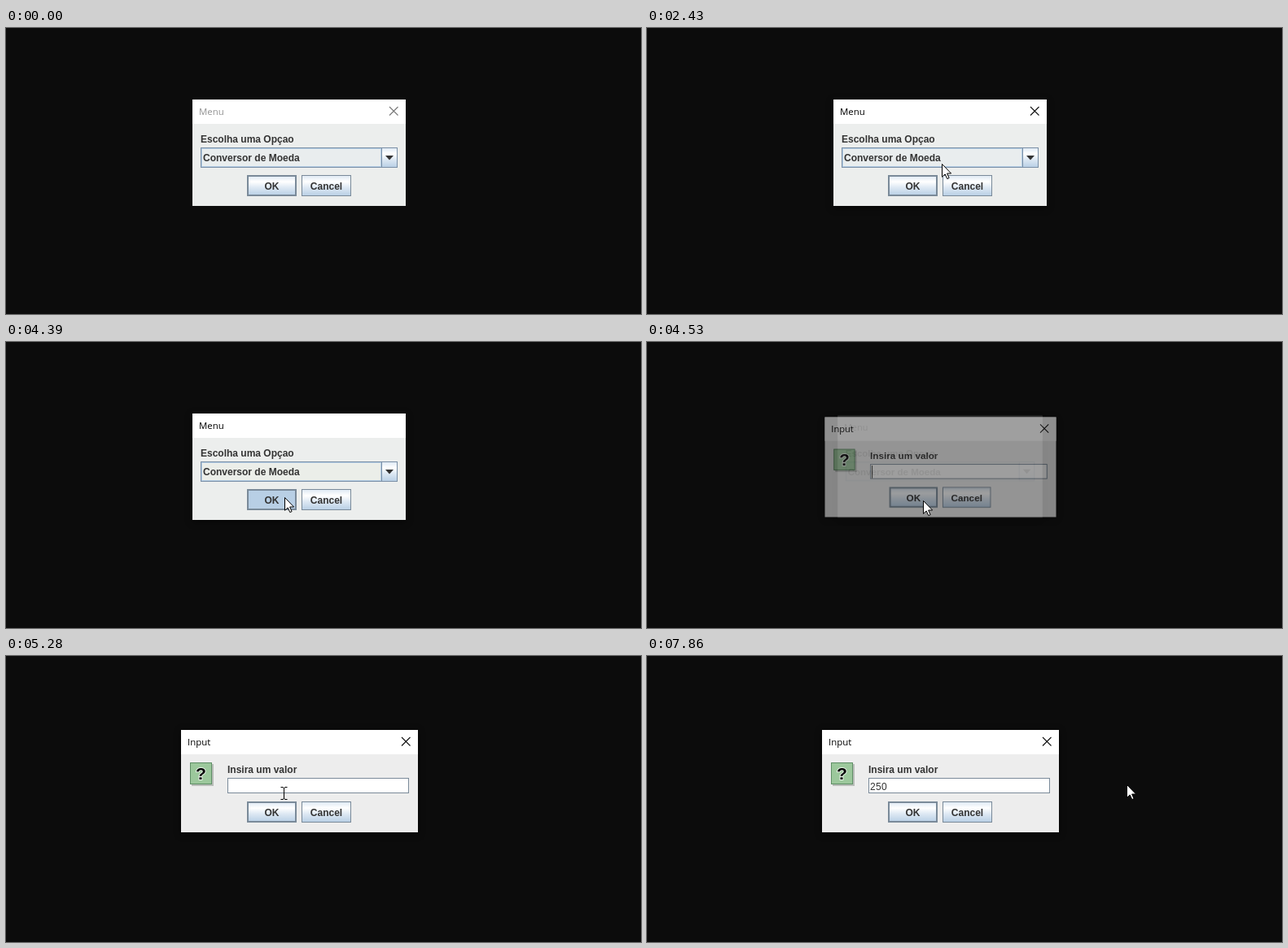
Write an HTML page that moves like this. It is 780 px wide and 352 px high and loops after 8000 ms.

```html
<!DOCTYPE html>
<html lang="pt">
<head>
<meta charset="utf-8">
<title>Menu</title>
<style>
  html, body { margin: 0; width: 100%; height: 100%; overflow: hidden; background: #0c0c0c; }
  svg { display: block; width: 100%; height: 100%; }
  text { font: bold 12px "Liberation Sans", Arial, sans-serif; fill: #333; white-space: pre; }
  .title { font: 11.4px "Open Sans", "Noto Sans", sans-serif; fill: #000; }
  .typed { font-weight: normal; letter-spacing: .33px; }
  .mid { text-anchor: middle; }
  .cross { stroke: #111; stroke-width: 1.1; fill: none; }
</style>
</head>
<body>
<svg id="stage" viewBox="0 0 780 352" preserveAspectRatio="none">
  <defs>
    <linearGradient id="ocean" x2="0" y2="1">
      <stop stop-color="#dde8f3"/>
      <stop offset=".3" stop-color="#fff"/>
      <stop offset=".6" stop-color="#dde8f3"/>
      <stop offset="1" stop-color="#b8cfe5"/>
    </linearGradient>
    <filter id="blur" x="-20%" y="-20%" width="140%" height="140%">
      <feGaussianBlur stdDeviation="5"/>
    </filter>
  </defs>
  <rect width="780" height="352" fill="#0c0c0c"/>
  <g id="menu"></g>
  <g id="input"></g>
  <path id="arrow" d="M.5 .5V16.3L4.2 12.9L6.8 18.6L9.1 17.6L6.6 12H11.6Z" fill="#fff" stroke="#000"/>
  <g id="beam" fill="none">
    <path d="M-3.5 -7.5H-1L.5 -6.5L2 -7.5H4.5M.5 -6.5V6.5M-3.5 7.5H-1L.5 6.5L2 7.5H4.5" stroke="#000"/>
  </g>
</svg>
<script>
const LOOP = 8000;
const $ = id => document.getElementById(id);
const show = (el, on) => el.setAttribute('display', on ? 'inline' : 'none');
const set = (id, name, value) => $(id).setAttribute(name, value);

const box = (x, y, w, h, fill, extra = '') =>
  `<rect x="${x}" y="${y}" width="${w}" height="${h}" fill="${fill}" ${extra}/>`;
const framed = (x, y, w, h, fill, stroke, line = 1, extra = '') =>
  box(x + line / 2, y + line / 2, w - line, h - line, fill, `stroke="${stroke}" stroke-width="${line}" ${extra}`);
const label = (x, y, str, cls = '', extra = '') =>
  `<text x="${x}" y="${y}" class="${cls}" ${extra}>${str}</text>`;

function frame(id, x, y, w, h, title, body) {
  const cx = x + w - 15, cy = y + 14;
  return box(x, y + 2, w, h, '#000', `id="${id}Shadow" filter="url(#blur)" opacity=".5"`) +
    box(x, y, w, h, body) + box(x, y, w, 30, '#fff') +
    label(x + 8, y + 19, title, 'title', `id="${id}Title"`) +
    `<path id="${id}Cross" class="cross" d="M${cx - 5} ${cy - 5}l10.5 10.5m0 -10.5l-10.5 10.5"/>`;
}

const buttons = (id, y) =>
  framed(296, y, 61, 26, 'url(#ocean)', '#7a8a99', 2, `id="${id}Ok"`) +
  framed(363, y, 61, 26, 'url(#ocean)', '#7a8a99') +
  label(326.5, y + 18, 'OK', 'mid') + label(393.5, y + 18, 'Cancel', 'mid');

$('menu').innerHTML =
  frame('menu', 229, 88, 262, 131, 'Menu', '#eceeed') +
  label(239, 141, 'Escolha uma Opçao') +
  framed(239, 147, 242, 25, '#e9edee', '#7a8fa6', 1, 'id="combo"') +
  framed(240, 148, 221, 23, 'none', '#b4cde4') +
  framed(461, 147, 20, 25, 'url(#ocean)', '#7a8fa6') +
  '<path d="M466 157h10l-5 5.5z" fill="#333"/>' +
  label(242, 164, 'Conversor de Moeda') +
  buttons('menu', 181) +
  '<g id="popup">' + framed(239, 172, 242, 38, '#eee', '#000') +
  box(240, 173, 240, 18, '#a3b8cc', 'id="mark"') +
  label(241, 187, 'Conversor de Moeda') + label(241, 205, 'Conversor de Temperatura') + '</g>';

$('input').innerHTML =
  frame('input', 215, 91, 291, 126, 'Input', '#ededed') +
  box(228, 133, 27, 27, '#b9bdb9') +
  framed(226, 131, 27, 27, '#9cc89c', '#5f8f66') +
  label(239.5, 152, '?', 'mid',
    'style="font-size:21px;fill:#000;stroke:#e6f2e6;stroke-width:2px;paint-order:stroke"') +
  label(272, 144, 'Insira um valor') +
  framed(272, 150, 223, 19, '#fff', '#7a8a99') +
  label(274, 165, '', 'typed', 'id="typed"') +
  box(274, 152, 1, 16, '#333', 'id="caret"') +
  buttons('input', 179);

// Pointer stops after the first sweep: time, x, y
const stops = [
  [2360, 362, 160], [2430, 362, 167], [2500, 362, 172],
  [2770, 358, 188], [2840, 355, 202], [3110, 355, 199], [3180, 355, 196], [3250, 355, 193],
  [3510, 354, 185], [3580, 353, 180], [3920, 350, 184], [4050, 347, 188], [4120, 345, 190],
  [4390, 342, 191], [4460, 341, 193], [4530, 339, 195], [4590, 339, 188], [4660, 339, 179],
  [4730, 339, 173], [4930, 336, 169], [5000, 332, 164], [5210, 346, 172], [5280, 341, 169],
  [5540, 470, 167], [5610, 589, 158]
];
// Window change: time, menu opacity, menu scale, input opacity, input scale
const fades = [
  [0, 1, 1, 0, 1], [4460, .6, .985, .15, .94], [4530, .14, .96, .54, .976],
  [4590, 0, 1, .82, .992], [4660, 0, 1, .96, .998], [4730, 0, 1, 1, 1]
];
const last = (list, t) => list.filter(row => row[0] <= t).pop();

function pointer(t) {
  const stop = last(stops, t);
  if (stop) return [stop[1], stop[2]];
  const p = Math.min(8, Math.floor((t - 940) / 70)) / 8;
  const left = (1 - p) ** 2;
  return [Math.round(362 + 354 * left), Math.round(154 - 145 * left)];
}

function fade(id, cx, cy, alpha, scale) {
  show($(id), alpha > 0);
  set(id, 'opacity', alpha);
  set(id, 'transform', `translate(${cx} ${cy}) scale(${scale}) translate(${-cx} ${-cy})`);
}

function draw(t) {
  const [, menuAlpha, menuScale, inputAlpha, inputScale] = last(fades, t);
  fade('menu', 360, 153.5, menuAlpha, menuScale);
  fade('input', 360.5, 154, inputAlpha, inputScale);

  const tone = t < 1630 ? '#929292' : t < 1700 ? '#555' : '#000';
  $('menuTitle').style.fill = tone;
  $('menuCross').style.stroke = t < 1630 ? '#777' : '#111';
  show($('menuCross'), t < 4390);
  show($('menuShadow'), t >= 1630);
  set('menuOk', 'fill', t >= 4390 ? '#b8cfe5' : 'url(#ocean)');
  set('combo', 'fill', t >= 3850 ? '#ebeee9' : '#e9edee');
  show($('popup'), t >= 2710 && t < 3850);
  set('mark', 'y', t >= 2770 && t < 3510 ? 191 : 173);

  const count = [6800, 7200, 7400].filter(at => t >= at).length;
  $('typed').textContent = '250'.slice(0, count);
  set('caret', 'x', 274 + 7 * count);
  show($('caret'), t < 5000 || (t >= 5540 && t < 6080) || (t >= 6540 && t < 7860));

  const [x, y] = pointer(t);
  const typing = t >= 5000 && t < 5540;
  show($('arrow'), t >= 940 && !typing);
  show($('beam'), typing);
  set('arrow', 'transform', `translate(${x} ${y})`);
  set('beam', 'transform', `translate(${x} ${y})`);
}

const start = performance.now();
function tick() {
  draw((performance.now() - start) % LOOP);
  requestAnimationFrame(tick);
}
tick();
</script>
</body>
</html>
```
